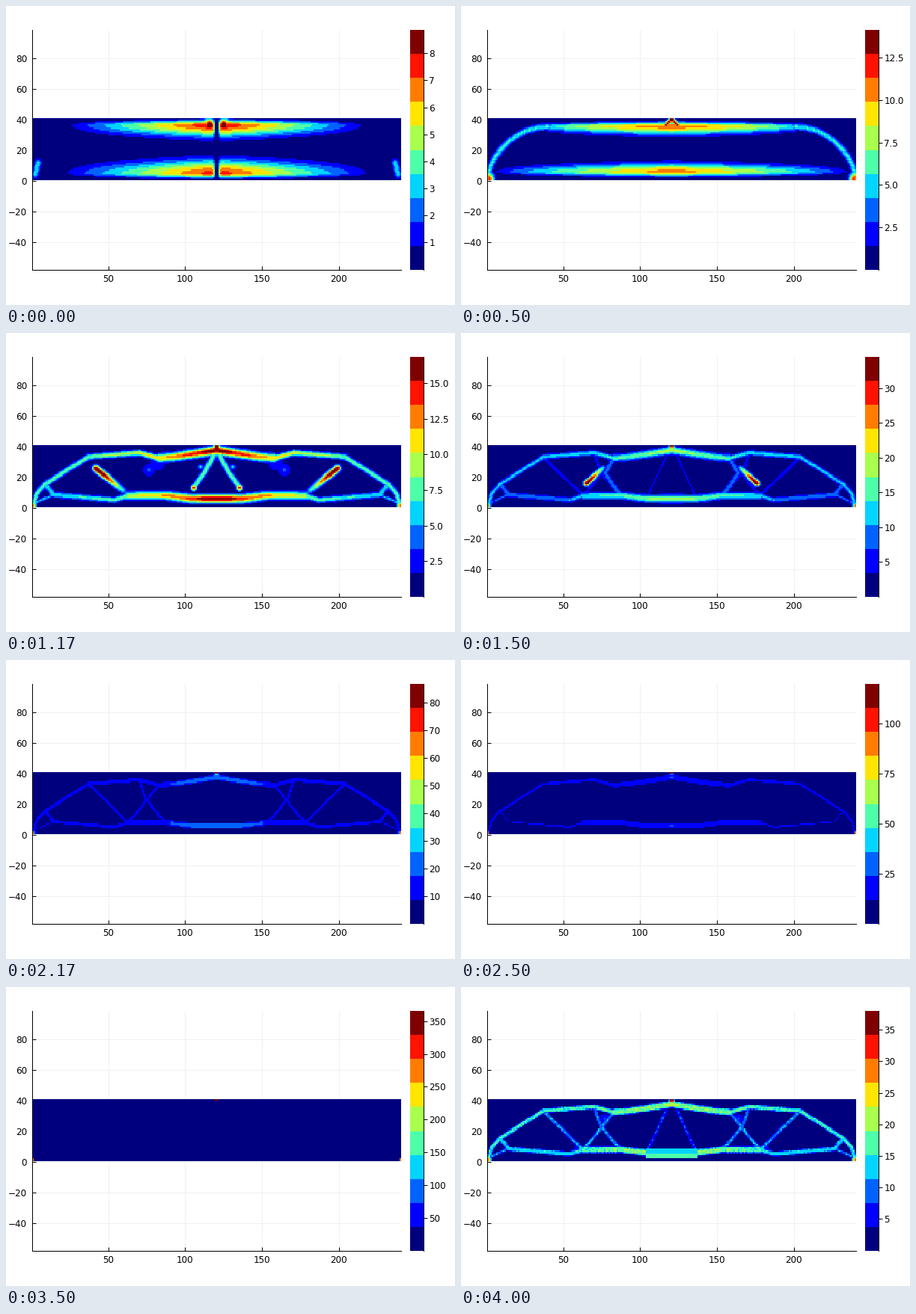
These frames come from a looping animation (600x400 px, 4.17 s). A matplotlib script:

```python
import numpy as np
import matplotlib.pyplot as plt
from matplotlib.animation import FuncAnimation

TICK_MS, TICKS = 30, 139    # one loop of 4170 ms
STEPS_PER_MS = 6 / 1000     # solver steps shown
LAST_STEP = 24
PX = 0.72                   # points per pixel at 100 dpi

# Left half of the beam; the right half mirrors it.
X, Y = np.meshgrid(np.arange(1, 121), np.arange(1, 41))

# Joints of the truss that the beam turns into.
support, knee, shoulder = (1, 1.5), (9, 15.5), (37, 33)
crest, neck, crown = (70, 35.5), (83, 32.2), (120, 37)
toe, dip, step, heel = (14, 8.5), (54, 5.2), (63, 7.8), (87, 8)
keel, middle = (104, 6), (120, 6)

RIM = [[support, (3.5, 9), knee, shoulder, crest, neck]]
FLOOR = [[toe, dip, step], [knee, toe]]
TIE = [[support, (4, 4), toe]]
CHORDS = [[neck, (93, 33), crown], [step, heel, keel, middle]]
WEBS = [[shoulder, step], [step, neck], [crest, (74, 24), heel]]
INNER_WEB = [[(117, 33), keel]]


def path(lines, width, power=2):
    """Profile of soft-edged bars along polylines, 1 on their axis."""
    near = np.full(X.shape, np.inf)
    for points in lines:
        for (x0, y0), (x1, y1) in zip(points, points[1:]):
            dx, dy = x1 - x0, y1 - y0
            t = ((X - x0) * dx + (Y - y0) * dy) / (dx * dx + dy * dy)
            t = np.clip(t, 0, 1)
            near = np.minimum(near, np.hypot(X - x0 - t * dx, Y - y0 - t * dy))
    return np.exp(-(near / width) ** power)


def spot(x, y, value, width):
    return value * np.exp(-(np.hypot(X - x, Y - y) / width) ** 2)


def ember(start, end, value, width):
    """Loose bar, hottest at its start."""
    reach = np.hypot(end[0] - start[0], end[1] - start[1])
    along = np.hypot(X - start[0], Y - start[1]) / reach
    return value * np.exp(-1.1 * along ** 2) * path([[start, end]], width)


def lens(y, up, down, start, peak, power):
    """Bending zone around height y that swells towards mid-span."""
    u = np.clip((X - start) / (120 - start), 0, 1)
    reach = np.where(Y > y, up, down) * np.maximum(u, .01) ** .2
    return peak * u ** power * np.exp(-((Y - y) / reach) ** 2)


def merge(*fields):
    return np.maximum.reduce(fields)


def solid_beam():
    gap = 1 - np.exp(-((120.5 - X) / 1.5) ** 2)
    bending = merge(lens(36, 2.8, 7, 18, 8.2, .9), spot(116, 36, 9.3, 4),
                    lens(5, 8.2, 2.7, 14, 7.7, .9))
    return merge(bending * gap, 3.3 * path([[(2.5, 4), (4.5, 12)]], 2.2))


def first_arch():
    theta = np.linspace(0, np.pi / 2, 10)
    arc = list(zip(40 - 39 * np.cos(theta), 1.5 + 33.5 * np.sin(theta) ** 1.2))
    return merge(5.7 * path([arc], 2.1), spot(*support, 13, 4),
                 lens(35.3, 2.4, 5, 32, 11, .35), lens(6, 5, 2.7, 3, 10.8, .6),
                 14 * path([[(117, 36), (120, 39)]], 1.5))


def truss(outer, inner, brace, width, power):
    """Chord stress grows from the supports to mid-span."""
    load = outer + (inner - outer) * (X / 120) ** 2.5
    return merge(load * path(RIM, width, power),
                 .85 * load * path(FLOOR, width, power),
                 .7 * outer * path(TIE, .6 * width, power),
                 load * path(CHORDS, 1.45 * width, power),
                 brace * path(WEBS, .85 * width, power),
                 .68 * brace * path(INNER_WEB, .85 * width, power),
                 spot(*support, 2 * outer, 2), spot(120.5, 39, 1.5 * inner, 1.6))


def islands():
    return merge(truss(7.7, 17.5, 0, 1.8, 2),
                 ember((42, 25.5), (60, 11), 18, 2.2),
                 8.3 * path([[(119, 34), (112, 22), (105, 13)]], 1.9),
                 spot(105.5, 13, 16, 2), spot(76.5, 24.5, 3.8, 4.5),
                 spot(110, 26.5, 5.4, 2), spot(82, 29, 2.6, 7))


def web():
    return merge(truss(11.5, 19.5, 6, 1.6, 2),
                 ember((65, 16), (76, 26), 36, 1.8),
                 10 * path([[neck, (77.5, 22.5), heel]], 1.6))


def settled():
    grain = np.random.default_rng(4).uniform(.84, 1.14, X.shape)
    slab = (X > 103) & (Y > 2) & (Y < 9)
    return np.where(slab, np.where(Y > 5, 13.3, 17),
                    merge(truss(16, 21, 11, 1.4, 4) * grain,
                          spot(60, 8, 8, 3.6), spot(77, 28, 8, 3.6)))


# Step, peak stress and field of each stage.
STAGES = [(0, 8.87, solid_beam()), (3, 14.15, first_arch()),
          (7, 16.87, islands()), (9, 34.5, web()),
          (13, 86.9, truss(13, 22, 11, 1.25, 4)),
          (18, 34.1, truss(16.5, 27, 8, 1.3, 2)), (24, 38.0, settled())]


def surge(n, centre, height):
    """Short rise of the peak while a bar breaks away."""
    return height * max(0, 1 - abs(n - centre) / 2)


def solve(n):
    """Peak stress and relative stress field of step n."""
    for (n0, peak0, a), (n1, peak1, b) in zip(STAGES, STAGES[1:]):
        if n <= n1:
            break
    k = (n - n0) / (n1 - n0)
    peak = peak0 * (peak1 / peak0) ** k + surge(n, 16, 120) + surge(n, 21, 330)
    half = (a + k * (b - a)) / peak
    if n > 1:
        half[39, 119] = 1       # load
        half[0:2, 0] = .75      # support
    return peak, np.clip(np.hstack([half, half[:, ::-1]]), 0, 1)


def bar_ticks(peak):
    gap = next(g for g in (1, 2.5, 5, 10, 25, 50) if peak <= 9 * g)
    values = np.arange(gap, peak, gap)
    return values / peak, [f"{v:.{int(gap % 1 > 0)}f}" for v in values]


def place(left, top, right, bottom):
    return fig.add_axes([left / 600, 1 - bottom / 400,
                         (right - left) / 600, (bottom - top) / 400])


plt.rcParams.update({"font.family": "DejaVu Sans", "font.size": 12 * PX,
                     "axes.linewidth": PX})
fig = plt.figure(figsize=(6, 4), dpi=100, facecolor="white")
jet = plt.get_cmap("jet", 10)

ax = place(35.2, 31.8, 527.8, 352.6)
image = ax.imshow(solve(0)[1], cmap=jet, vmin=0, vmax=1, origin="lower",
                  extent=(.5, 240.5, .5, 40.5), aspect="auto",
                  interpolation="nearest", zorder=1)
ax.set(xlim=(.5, 240.5), ylim=(-57.75, 98.55),
       xticks=range(50, 201, 50), yticks=range(-40, 81, 20))
ax.set_axisbelow(True)
ax.grid(color="#f0f0f0", linewidth=PX)
ax.tick_params(direction="in", length=5 * PX, width=PX)
ax.tick_params(axis="x", pad=6.5 * PX)
ax.tick_params(axis="y", pad=7 * PX)
ax.spines[["top", "right"]].set_visible(False)

cax = place(540, 31.8, 558, 352.6)
cax.imshow(np.arange(10)[:, None], cmap=jet, origin="lower",
           extent=(0, 1, 0, 1), aspect="auto", interpolation="nearest")
cax.set_xticks([])
cax.yaxis.tick_right()
cax.tick_params(axis="y", length=5 * PX, width=PX, pad=2.5 * PX)
cax.spines[["left", "top", "bottom"]].set_visible(False)


def update(tick):
    # A step shows from the tick in which it begins.
    end = (tick + 1) * TICK_MS - 1
    peak, field = solve(min(int(end * STEPS_PER_MS), LAST_STEP))
    image.set_data(field)
    cax.set_yticks(*bar_ticks(peak))
    cax.set_ylim(0, 1)
    return [image]


anim = FuncAnimation(fig, update, frames=TICKS, interval=TICK_MS,
                     init_func=lambda: update(0), repeat=True, repeat_delay=0)
plt.show()
```
